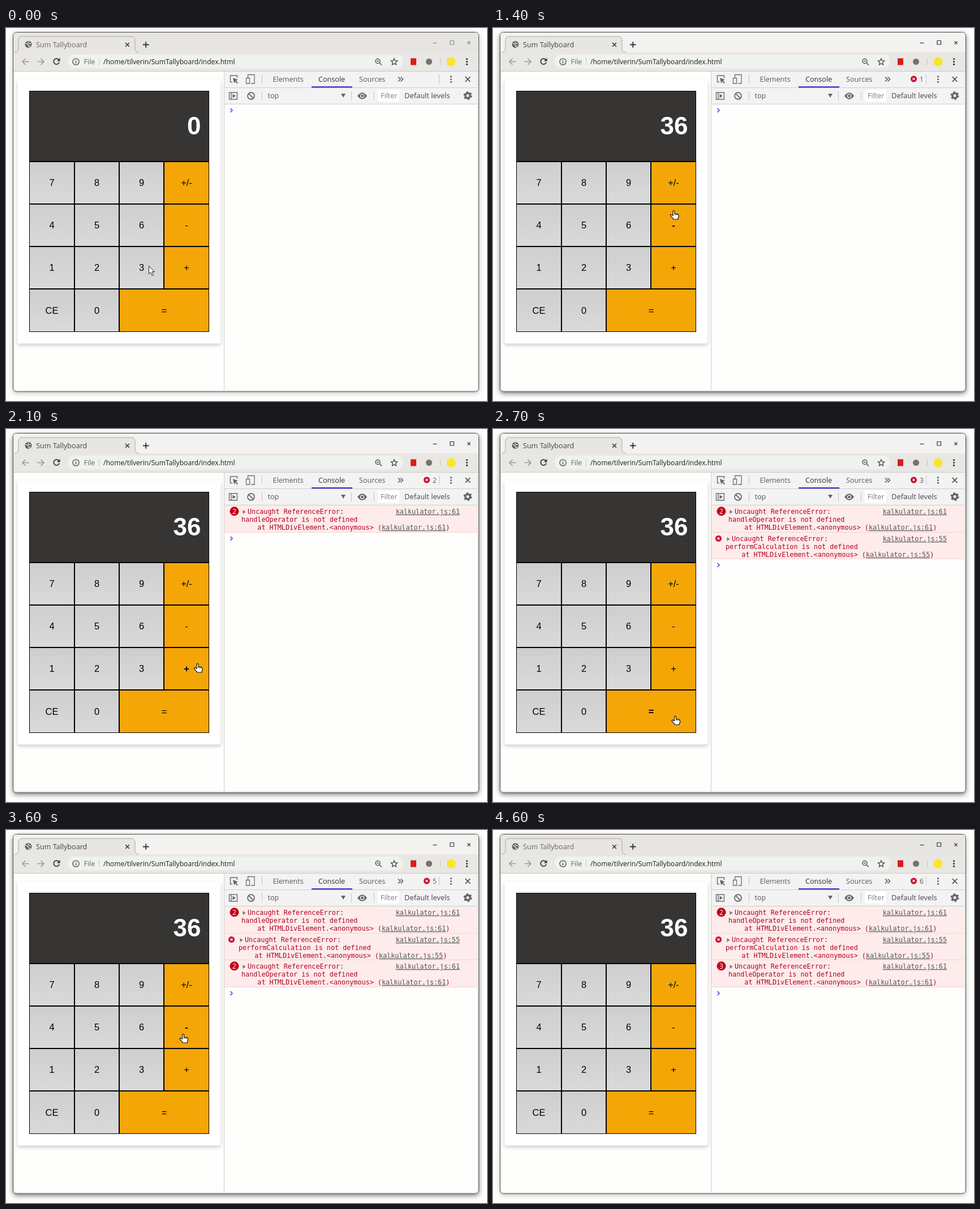
Recreate the animation shown at these times as an HTML page. Size 850 px wide and 659 px high, loop 4700 ms.

```html
<!DOCTYPE html>
<html lang="en">
<head>
<meta charset="utf-8">
<title>Calculator console</title>
<style>
html, body { margin: 0; width: 100%; height: 100%; overflow: hidden; background: #fefefd; }
svg { display: block; width: 100%; height: 100%; }
text { white-space: pre; }
.ui { font: 12.6px "Open Sans", "Noto Sans", sans-serif; }
.key { font: 16.5px "Liberation Sans", Arial, sans-serif; text-anchor: middle; }
.mono { font: 11.77px "DejaVu Sans Mono", monospace; fill: #b00022; }
.total { font: bold 44px "Liberation Sans", Arial, sans-serif; text-anchor: end; fill: #fff; }
.link { fill: #545454; text-decoration: underline; }
.line { fill: none; }
.card { filter: drop-shadow(0 3px 3px rgba(0, 0, 0, .2)); }
</style>
</head>
<body>
<svg id="stage" viewBox="0 0 850 659" xmlns="http://www.w3.org/2000/svg"></svg>
<script>
const LOOP = 4700, STEP = 100;
const stage = document.getElementById('stage');

const rect = (x, y, w, h, fill, more = '') =>
  `<rect x="${x}" y="${y}" width="${w}" height="${h}" fill="${fill}" ${more}/>`;
const disc = (x, y, r, fill, more = '') =>
  `<circle cx="${x}" cy="${y}" r="${r}" fill="${fill}" ${more}/>`;
const line = (d, color = '#6e6e6e', width = 1.5, more = '') =>
  `<path class="line" d="${d}" style="stroke:${color};stroke-width:${width}" ${more}/>`;
const text = (x, y, s, cls = 'ui', fill = '', more = '') =>
  `<text x="${x}" y="${y}" class="${cls}" ${fill && `fill="${fill}"`} ${more}>${s}</text>`;
const cross = (x, y, r, color, width) =>
  line(`M${x - r} ${y - r}l${2 * r} ${2 * r}m0 ${-2 * r}l${-2 * r} ${2 * r}`, color, width);
const dots = (x, y, gap, fill) => [-gap, 0, gap].map(d => disc(x, y + d, 1.6, fill)).join('');
const bar = (x, y, h) => rect(x, y, 1, h, '#c6c6c6');
const errorIcon = (x, y) => disc(x, y, 5.5, '#d00028') + cross(x, y, 2, '#fff', 1.3);

// Calculator keys
const COLS = [41, 121, 200, 279, 359], ROWS = [236, 311, 386, 461, 537];
const LABELS = [['7', '8', '9', '+/-'], ['4', '5', '6', '-'], ['1', '2', '3', '+'], ['CE', '0', '=']];
const keys = LABELS.flatMap((row, r) => row.map((label, c) => ({
  label, x: COLS[c], y: ROWS[r],
  right: label === '=' ? COLS[4] : COLS[c + 1], bottom: ROWS[r + 1],
  fill: c === 3 || label === '=' ? '#f5a607' : 'url(#grey)'
})));

const drawKey = k =>
  rect(k.x, k.y, k.right - k.x, k.bottom - k.y, k.fill, 'stroke="#000" stroke-width="2"') +
  text((k.x + k.right) / 2, (k.y + k.bottom) / 2 + 5.5, k.label, 'key', '#000', 'data-key');

function browser() {
  return rect(12.5, 7.5, 823, 635, '#fefefd', 'id="frame" rx="6" stroke="#4a4a4a"') +
    '<path id="strip" d="M13 44V14q0-6 6-6H829q6 0 6 6V44z"/>' +
    rect(13, 43, 822, 33, '#e8e7e4') +
    '<path d="M15 43.5q7 0 7-7V22q0-7 7-7H221q7 0 7 7V36.5q0 7 7 7z" fill="#e8e6e3"/>' +
    line('M15 43q7 0 7-7V22q0-7 7-7H221q7 0 7 7V36q0 7 7 7', '#aaa8a4', 1) +
    disc(39.5, 29, 6, '#5a5d60') +
    line('M35 27l4 2 1 4M39 24l1 3 4 1M43 31l-2 3', '#e8e6e3', 1.4) +
    text(53, 33.5, 'Sum Tallyboard', 'ui', '', 'id="title"') +
    cross(214.5, 29.5, 3.4, '#444', 1.5) +
    line('M242 29.5h10.5m-5.25-5.25v10.5', '#333', 1.8) +
    '<g id="controls">' + line('M754.5 26.5h7', 'currentColor', 1.2) +
    line('M785 22.5h6.5v6.5h-6.5z', 'currentColor', 1.2) +
    cross(818, 26, 2.5, 'currentColor', 1.2) + '</g>' +
    line('M40.5 59.5H29m5.5-5.5l-5.5 5.5 5.5 5.5', '#999', 1.6) +
    line('M55.5 59.5H67m-5.5-5.5l5.5 5.5-5.5 5.5', '#999', 1.6) +
    line('M93.5 56.5a5 5 0 1 0 .6 4', '#333', 1.8) + '<path d="M95.5 53v5.5H90z" fill="#333"/>' +
    rect(109, 47, 593, 24, '#eff3ef', 'rx="12"') +
    disc(123.5, 59.5, 5.6, 'none', 'stroke="#555" stroke-width="1.4"') +
    line('M123.5 58.5v4m0-6.5v1.3', '#555', 1.5) +
    text(137.5, 63.5, 'File', 'ui', '#666') + bar(164, 53, 13) +
    text(172, 63.5, '/home/tilverin/SumTallyboard/index.html', 'ui', '#1d1d1d', 'style="font-size:12.1px"') +
    disc(657, 58.5, 4, 'none', 'stroke="#555" stroke-width="1.5"') +
    line('M660 61.5l4 4M655 58.5h4', '#555', 1.5) +
    line('M686 54l1.6 3.7 4 .4-3 2.7.9 4-3.5-2.1-3.5 2.1.9-4-3-2.7 4-.4z', '#444', 1.3) +
    rect(715, 53.5, 10, 12, '#db1c1c') + disc(747.5, 59.5, 5.5, '#77736b') +
    bar(767, 53, 13) + disc(786.5, 59.5, 8, '#f8e62d') + dots(814.5, 59.5, 4.7, '#333') +
    rect(13, 76, 822, 1, '#c9c8c5') +
    rect(14, 77, 1, 563, '#dcdcda') + rect(833, 77, 1, 563, '#dcdcda') +
    rect(14, 640, 820, 1, '#d4d4d2');
}

function calculator() {
  return rect(20.5, 91, 359, 466.5, '#fff', 'rx="4" class="card"') +
    `<g clip-path="url(#pad)">${keys.map(drawKey).join('')}</g>` +
    rect(41.5, 111.5, 317, 124, '#373533', 'stroke="#000"') +
    text(344.5, 188.3, '0', 'total', '', 'id="total"');
}

function devtools() {
  const gear = disc(816, 119.5, 4.2, 'none', 'stroke="#666" stroke-width="3.4"') +
    disc(816, 119.5, 6.4, 'none', 'stroke="#666" stroke-width="2.4" stroke-dasharray="3.35"');
  return rect(386, 77, 447, 58, '#f3f3f3') + rect(385, 77, 1, 563, '#cdcdcd') +
    rect(386, 105, 447, 1, '#cfcfcf') + rect(386, 134, 447, 1, '#cfcfcf') +
    line('M400 95.5h-3.5v-11.5h12v4') +
    '<path d="M401 88l9 3.5-3.6 1.6 3.6 3.8-1.5 1.3-3.6-3.6-1.7 3.4z" fill="#666"/>' +
    line('M427.5 88v-5.5h11.5v15.5h-6M424.5 88.5h6v9.5h-6z', '#6e6e6e', 1.3) +
    bar(452, 82, 16) + text(471.5, 94.5, 'Elements', 'ui', '#5a5a5a') +
    text(552, 94.5, 'Console', 'ui', '#303030') + text(624, 94.5, 'Sources', 'ui', '#5a5a5a') +
    rect(540, 103, 72, 2.5, '#443fcf') +
    line('M693 86.5l4 4-4 4m4.5-8l4 4-4 4', '#555', 1.5) +
    '<g id="badge">' + errorIcon(743.5, 90) +
    text(754, 94.5, '', 'ui', '#555', 'id="errors" style="font-size:12px"') + '</g>' +
    bar(765, 82, 16) + dots(786.5, 90.5, 4.8, '#666') + cross(816, 90.5, 4.3, '#555', 1.7) +
    line('M394.5 114h14v12h-14zM398 114v12', '#6e6e6e', 1.4) +
    '<path d="M400.5 116.5l5.5 3.5-5.5 3.5z" fill="#666"/>' +
    disc(433, 120, 6, 'none', 'stroke="#6e6e6e" stroke-width="1.8"') + line('M429 116l8 8', '#6e6e6e', 1.8) +
    bar(452, 112, 16) + text(462.5, 124, 'top', 'ui', '#555') +
    '<path d="M592 116h8l-4 7z" fill="#666"/>' + bar(610, 112, 16) +
    '<path d="M621 120q8.5-11.5 17 0q-8.5 11.5-17 0z" fill="#666"/>' +
    disc(629.5, 120, 3.1, '#666', 'stroke="#f3f3f3" stroke-width="1.4"') +
    bar(650, 112, 16) + rect(657, 109, 38, 21, '#fff') +
    text(662, 124, 'Filter', 'ui', '#7a7a7a', 'clip-path="url(#field)"') +
    text(704, 124, 'Default levels', 'ui', '#444', 'style="font-size:12.9px"') + gear +
    '<g id="log"></g>' + line('M396.5 142l3.5 3.5-3.5 3.5', '#4a49d8', 1.6, 'id="prompt"');
}

const HAND = 'M-2 8.8V1.7a1.5 1.5 0 0 1 3 0V5.5l5 .6q2 .4 2 2.4v3l-1.2 2.5v1.5h-8l-1-2-4-4q-1.2-2 1-2.3z';

stage.innerHTML = `<defs><linearGradient id="grey" x2="0" y2="1">
  <stop stop-color="#cecece"/><stop offset="1" stop-color="#dadada"/></linearGradient>
  <clipPath id="pad">${rect(41, 111, 318, 426, '#000')}</clipPath>
  <clipPath id="field">${rect(657, 109, 34.5, 21, '#000')}</clipPath></defs>` +
  browser() + calculator() + devtools() +
  `<g id="arrow"><path d="M.5 .5v14l3.2-3 2.5 5.8 2.5-1.1-2.5-5.6h4.2z" fill="#fff" stroke="#222"/></g>
  <g id="hand"><path d="${HAND}" fill="#fff" stroke="#111" stroke-width="1.2"/>
  ${line('M1 5.5v3m2.5-2.5v2.5m2.3-2v2', '#111', .8)}</g>`;

const el = Object.fromEntries([...stage.querySelectorAll('[id]')].map(n => [n.id, n]));
const keyTexts = stage.querySelectorAll('[data-key]');

// Pointer path: time, x, y
const PATH = [[0, 252, 420], [99, 252, 420], [100, 255.5, 420], [300, 255.5, 420], [700, 258, 374],
  [800, 258, 365], [900, 258, 365], [1300, 320, 322.5], [1600, 320, 322.5], [1900, 339, 414.5],
  [2100, 339, 414.5], [2500, 322.5, 507], [2700, 322.5, 507], [2900, 328, 422], [3300, 328, 422],
  [3600, 313.5, 360.5], [3800, 313.5, 360.5], [4100, 129, 80.5], [4700, 129, 80.5]];

// Latest value set at or before t
const latest = (list, t) => list.filter(([at]) => at <= t).pop()[1];
const TOTAL = [[0, '0'], [300, '3'], [900, '36']];
const ERRORS = [[0, 0], [1400, 1], [2100, 2], [2700, 3], [3100, 4], [3300, 5], [3800, 6]];
const LOG = [[0, []], [1600, [1]], [2100, [2]], [2700, [2, 1]], [3100, [2, 1, 1]],
  [3300, [2, 1, 2]], [3800, [2, 1, 3]]];
const rowTop = i => Math.round(135 + i * 47.6);

function pointer(t) {
  const i = PATH.findIndex(([at]) => at > t);
  const [t0, x0, y0] = PATH[i - 1], [t1, x1, y1] = PATH[i];
  const p = (t - t0) / (t1 - t0);
  return [x0 + (x1 - x0) * p, y0 + (y1 - y0) * p];
}

function logRow(count, i) {
  const y = rowTop(i), h = rowTop(i + 1) - y, x = count > 1 ? 416 : 411;
  const [name, at] = i === 1 ? ['performCalculation', 55] : ['handleOperator', 61];
  const file = `kalkulator.js:${at}`;
  const icon = count > 1
    ? disc(403.5, y + 10.3, 8, '#c00018') +
      text(403.5, y + 14.6, count, 'ui', '#fff', 'text-anchor="middle" style="font-size:12px"')
    : errorIcon(398.5, y + 10.5);
  return rect(386, y, 447, h, '#fdeceb') + rect(386, y + h - 1, 447, 1, '#f8d3d3') + icon +
    `<path d="M${x + 2.5} ${y + 8}l5 3.5-5 3.5z" fill="#777"/>` +
    text(x + 11, y + 15, 'Uncaught ReferenceError:', 'mono') +
    text(802, y + 15, `<tspan class="link">${file}</tspan>`, 'mono', '', 'text-anchor="end"') +
    text(x, y + 29, `${name} is not defined`, 'mono') +
    text(x, y + 43, `    at HTMLDivElement.&lt;anonymous&gt; (<tspan class="link">${file}</tspan>)`, 'mono');
}

const show = (node, on) => node.setAttribute('visibility', on ? 'visible' : 'hidden');

function render(time) {
  const t = Math.floor(time / STEP) * STEP;
  const focused = t >= 300 && t < 4600;
  el.frame.style.filter = focused
    ? 'drop-shadow(0 3px 4px rgba(0,0,0,.5))' : 'drop-shadow(0 2px 4px rgba(0,0,0,.24))';
  el.strip.setAttribute('fill', focused ? '#f3f2f0' : '#e7e5e2');
  el.title.setAttribute('fill', focused ? '#444' : '#686868');
  el.controls.style.color = t < 300 ? '#8c8b88' : '#333';

  const [x, y] = pointer(t);
  const over = t < 100 || t >= 4300 ? null
    : keys.find(k => x >= k.x && x < k.right && y >= k.y && y < k.bottom);
  keys.forEach((k, i) => { keyTexts[i].style.fontWeight = k === over ? 'bold' : 'normal'; });
  show(el.hand, over);
  show(el.arrow, !over && t < 4300);
  for (const c of [el.hand, el.arrow]) c.setAttribute('transform', `translate(${x} ${y})`);

  el.total.textContent = latest(TOTAL, t);
  const errors = latest(ERRORS, t), log = latest(LOG, t);
  show(el.badge, errors);
  el.errors.textContent = errors;
  el.log.innerHTML = log.map(logRow).join('');
  el.prompt.setAttribute('transform', `translate(0 ${rowTop(log.length) - rowTop(0)})`);
}

function tick() {
  render(performance.now() % LOOP);
  requestAnimationFrame(tick);
}
tick();
</script>
</body>
</html>
```
